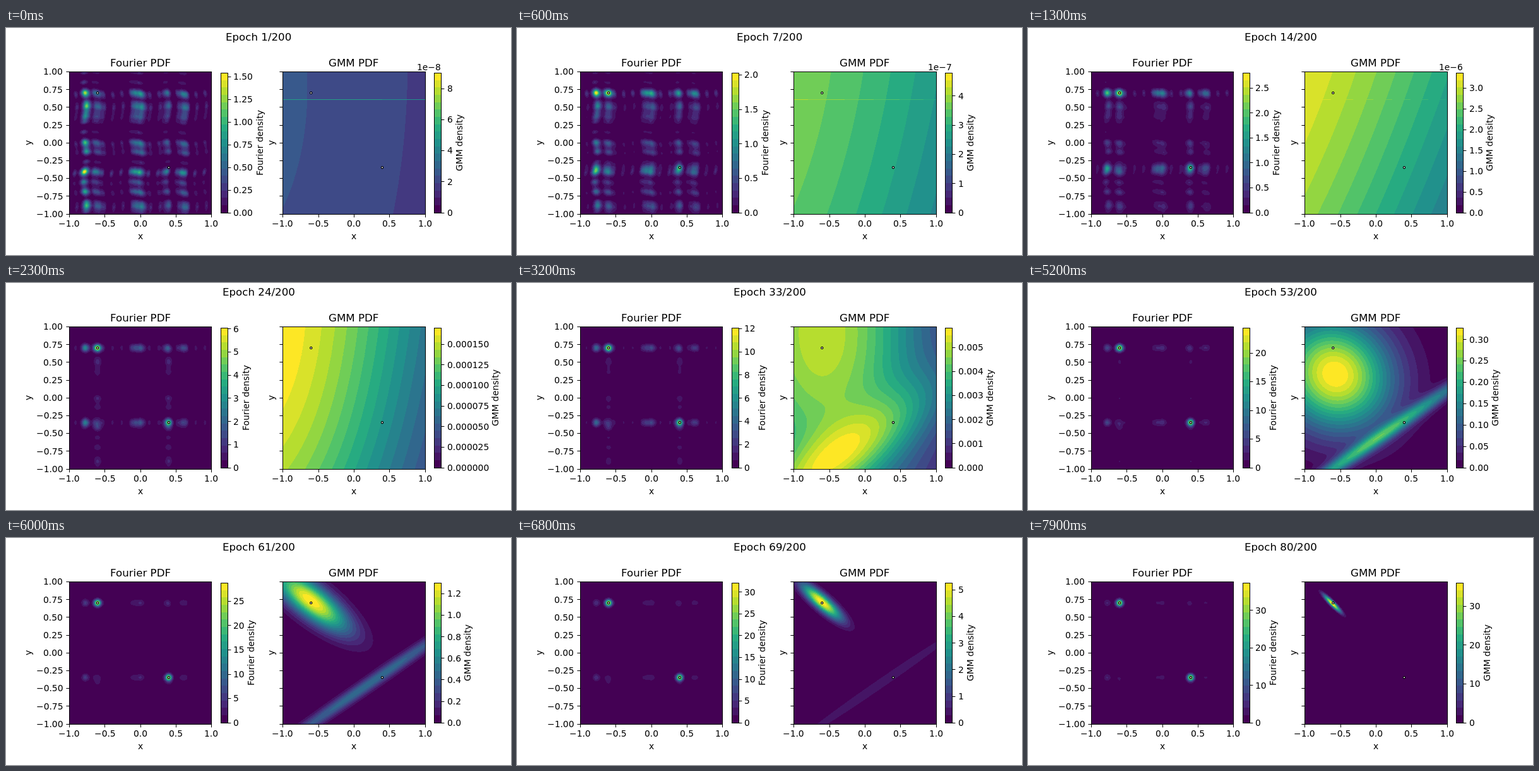
Recreate the animation shown at these times as an HTML page with a canvas. Size 800 by 360 pixels, loop 8000 ms.

```html
<!DOCTYPE html>
<html>
<head>
<meta charset="utf-8">
<style>
html, body { margin: 0; width: 800px; height: 360px; overflow: hidden; background: #fff; }
canvas { display: block; }
</style>
</head>
<body>
<canvas id="stage" width="800" height="360"></canvas>
<script>
const ctx = document.getElementById('stage').getContext('2d');
const N = 227, SIDE = 225.45, TOP = 69.07, BANDS = 19;
const BAR_TOP = 70.92, BAR_BOTTOM = 292.68;
const snap = v => Math.floor(v + 0.5) + 0.5;
const gauss = (d, s) => Math.exp(-d * d / (2 * s * s));

// Viridis from nine evenly spaced stops
const stops = ['440154', '472d7b', '3b528b', '2c728e', '21918c', '28ae80', '5ec962', 'addc30', 'fde725']
  .map(hex => hex.match(/../g).map(h => parseInt(h, 16)));
const palette = Array.from({ length: BANDS }, (_, i) => {
  const v = i / (BANDS - 1) * 8, k = Math.min(7, Math.floor(v));
  return stops[k].map((c, j) => Math.round(c + (stops[k + 1][j] - c) * (v - k)));
});

// Epoch, Fourier maximum, GMM maximum, blob (x, y, long sigma, short sigma, angle), ridge height
const poses = [
  [1, 1.54, 9e-8, -1.6, 0.5, 7, 3.2, 86, 0],
  [14, 2.8, 3.36e-6, -2.04, 0.83, 8, 2.7, 68, 0.001],
  [33, 12.05, 0.0058, -0.6, 0.9, 1.9, 1.05, 90, 0.49],
  [43, 18.3, 0.1025, 0.14, 0.92, 1.3, 0.6, 79, 0.53],
  [53, 24.35, 0.327, -0.57, 0.33, 0.57, 0.52, 140, 0.58],
  [61, 28.75, 1.3, -0.6, 0.73, 0.44, 0.153, 142, 0.36],
  [80, 37.3, 36, -0.61, 0.69, 0.11, 0.022, 135, 0.0125]
];

// Positive pairs blend geometrically, all others linearly
function poseAt(epoch) {
  const i = Math.max(1, poses.findIndex(p => p[0] >= epoch));
  const a = poses[i - 1], b = poses[i], k = (epoch - a[0]) / (b[0] - a[0]);
  return a.map((v, j) => v > 0 && b[j] > 0 ? v * (b[j] / v) ** k : v + (b[j] - v) * k);
}

function field(fn, left) {
  const out = new Float32Array(N * N);
  for (let r = 0, i = 0; r < N; r++) {
    const y = 1 - (Math.floor(TOP) + r + 0.5 - TOP) * 2 / SIDE;
    for (let c = 0; c < N; c++, i++)
      out[i] = fn((Math.floor(left) + c + 0.5 - left) * 2 / SIDE - 1, y);
  }
  return out;
}
function normalize(f) {
  const max = f.reduce((m, v) => Math.max(m, v), 0);
  return f.map(v => v / max);
}

// A profile is a fine ripple plus its strongest peaks as [position, weight]
const profile = (peaks, period) => v => peaks.reduce((sum, [p, w]) => sum + w * gauss(v - p, 0.04),
  0.2 * Math.cos(Math.PI * v / period) ** 4);
const alongX = profile([[-0.77, 1], [-0.6, 0.5], [-0.07, 0.6], [0.02, 0.5], [0.36, 0.4], [0.6, 0.6]], 0.13);
const alongY = profile([[0.68, 0.8], [0.5, 0.85], [0.36, 0.55], [-0.02, 0.6], [-0.13, 0.4],
  [-0.42, 0.9], [-0.57, 0.3], [-0.7, 0.45], [-0.9, 0.75]], 0.14);
const points = [[-0.6, 0.7], [0.4, -0.35]];
const overPoints = fn => field((x, y) => points.reduce((sum, [px, py]) => sum + fn(x, y, x - px, y - py), 0), 100);

const base = normalize(field((x, y) =>
  alongX(x + 0.02 * Math.sin(9 * y)) * alongY(y + 0.015 * Math.sin(11 * x)), 100));
const cross = overPoints((x, y, dx, dy) =>
  0.9 * alongX(x) * gauss(dy, 0.037) + 0.35 * alongY(y) * gauss(dx, 0.037));
const peaks = overPoints((x, y, dx, dy) => gauss(dx, 0.031) * gauss(dy, 0.031));

function fourier(epoch) {
  const b = gauss(epoch - 1, 10.6), p = 1 - Math.exp((1 - epoch) / 6), r = p * Math.exp(0.12 - 0.029 * epoch);
  return normalize(base.map((v, i) => b * v + r * cross[i] + p * peaks[i]));
}

function ellipse(cx, cy, s1, s2, angle) {
  const c = Math.cos(angle * Math.PI / 180), s = Math.sin(angle * Math.PI / 180);
  return (x, y) => gauss((x - cx) * c + (y - cy) * s, s1) * gauss((y - cy) * c - (x - cx) * s, s2);
}

function gmm(epoch, blobShape, height) {
  const blob = ellipse(...blobShape);
  // The ridge slides along a fixed line while it narrows
  const cx = -0.6 + 0.8 * Math.min(1, Math.max(0, (epoch - 33) / 28));
  const ridge = ellipse(cx, 0.69 * cx - 0.588, 1.3, 0.06 + 0.24 * Math.exp((33 - epoch) / 6.5), 34.6);
  const peak = 1 - 0.73 * Math.exp((1 - epoch) / 5);
  const streak = 0.3 * Math.exp((1 - epoch) / 4.6), row = 44;
  return normalize(field((x, y) => blob(x, y) + height * ridge(x, y), 438.18))
    .map((v, i) => v * peak + (Math.floor(i / N) === row ? streak : 0));
}

function text(str, x, y, { align = 0.5, size = 13.89, turn = 0 } = {}) {
  ctx.save();
  ctx.font = `${size}px "DejaVu Sans", sans-serif`;
  ctx.fillStyle = '#000';
  const width = ctx.measureText(str).width, shift = width * align;
  ctx.translate(Math.round(turn ? x : x - shift), Math.round(turn ? y + shift : y));
  ctx.rotate(turn);
  ctx.fillText(str, 0, 0);
  ctx.restore();
  return width;
}
const upright = { turn: -Math.PI / 2 };
const minus = s => s.replace('-', '\u2212');

function line(x1, y1, x2, y2) {
  ctx.beginPath();
  ctx.moveTo(x1, y1);
  ctx.lineTo(x2, y2);
  ctx.stroke();
}
function frame(x1, y1, x2, y2) {
  ctx.strokeRect(snap(x1), snap(y1), snap(x2) - snap(x1), snap(y2) - snap(y1));
}

function plot(left, data, title, labelled) {
  const img = ctx.createImageData(N, N);
  data.forEach((v, i) => {
    img.data.set(palette[Math.min(BANDS - 1, Math.floor(v * BANDS))], i * 4);
    img.data[i * 4 + 3] = 255;
  });
  const x0 = Math.floor(left), right = left + SIDE, bottom = TOP + SIDE;
  ctx.putImageData(img, x0, 69, 0, 0, snap(right) + 0.5 - x0, N);
  ctx.lineWidth = 1.2;
  ctx.strokeStyle = '#000';
  ctx.fillStyle = '#fff';
  for (const [x, y] of points) {
    ctx.beginPath();
    ctx.arc(left + (x + 1) * SIDE / 2, TOP + (1 - y) * SIDE / 2, 1.6, 0, 7);
    ctx.fill();
    ctx.stroke();
  }
  ctx.lineWidth = 1;
  frame(left, TOP, right, bottom);
  for (let i = 0; i < 5; i++) {
    const x = left + i * SIDE / 4;
    line(snap(x), 296, snap(x), 300.4);
    text(minus((i / 2 - 1).toFixed(1)), x, 315);
  }
  for (let i = 0; i < 9; i++) {
    const y = TOP + i * SIDE / 8;
    line(x0 - 4.6, snap(y), x0, snap(y));
    if (labelled) text(minus((1 - i / 4).toFixed(2)), left - 9.7, y + 5.3, { align: 1 });
  }
  text(title, left + SIDE / 2, 61, { size: 16.67 });
  text('x', left + SIDE / 2, 335);
  text('y', labelled ? 39.5 : 424.5, 181.8, upright);
}

function tickStep(max) {
  const raw = max / 7, unit = 10 ** Math.floor(Math.log10(raw));
  return [1, 2, 2.5, 5, 10].find(s => s * unit >= raw * 0.99999) * unit;
}

function colorbar(left, max, label) {
  const right = left + 11.09, height = BAR_BOTTOM - BAR_TOP;
  palette.forEach((c, i) => {
    const y = Math.round(BAR_BOTTOM - (i + 1) / BANDS * height);
    ctx.fillStyle = `rgb(${c})`;
    ctx.fillRect(Math.round(left), y, 11, Math.round(BAR_BOTTOM - i / BANDS * height) - y);
  });
  frame(left, BAR_TOP, right, BAR_BOTTOM);
  let step = tickStep(max);
  const count = Math.floor(max / step + 1e-6);
  const power = Math.floor(Math.log10(count * step) + 1e-9);
  if (power <= -5) {
    max /= 10 ** power;
    step /= 10 ** power;
    text(minus(`1e${power}`), right, 67, { align: 1 });
  }
  let digits = 0;
  while (Math.abs(step * 10 ** digits - Math.round(step * 10 ** digits)) > 1e-6) digits++;
  let width = 0;
  for (let i = 0; i <= count; i++) {
    const y = BAR_BOTTOM - i * step / max * height;
    line(snap(right), snap(y), snap(right) + 4.9, snap(y));
    width = Math.max(width, text((i * step).toFixed(digits), right + 9.7, y + 5.3, { align: 0 }));
  }
  text(label, right + 25.2 + width, 181.8, upright);
}

function draw(epoch) {
  ctx.fillStyle = '#fff';
  ctx.fillRect(0, 0, 800, 360);
  const [, fourierMax, gmmMax, ...shape] = poseAt(epoch), height = shape.pop();
  text(`Epoch ${epoch}/200`, 400, 20, { size: 16.67 });
  plot(100, fourier(epoch), 'Fourier PDF', true);
  colorbar(339.55, fourierMax, 'Fourier density');
  plot(438.18, gmm(epoch, shape, height), 'GMM PDF', false);
  colorbar(677.73, gmmMax, 'GMM density');
}

let shown = 0;
const start = performance.now();
function tick() {
  const epoch = Math.floor((performance.now() - start) % 8000 / 100) + 1;
  if (epoch !== shown) draw(shown = epoch);
  requestAnimationFrame(tick);
}
tick();
</script>
</body>
</html>
```
